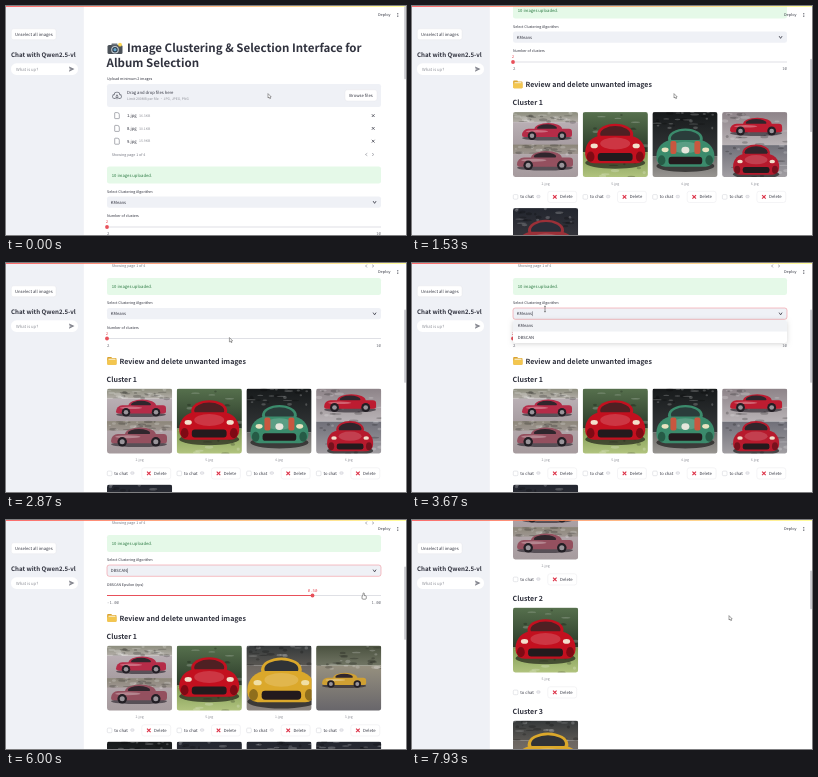
An HTML page with a canvas for the animation above (8000 ms loop, 400 by 229 pixels).

```html
<!DOCTYPE html>
<html lang="en">
<head>
<meta charset="utf-8">
<title>Image clustering</title>
<style>
html, body { margin: 0; width: 100%; height: 100%; overflow: hidden; background: #fff; }
canvas { display: block; width: 100vw; height: 100vh; }
</style>
</head>
<body>
<canvas id="stage"></canvas>
<script>
const W = 400, H = 229, LOOP = 8000;
const canvas = document.getElementById('stage');
const ctx = canvas.getContext('2d');
const SANS = '"Noto Sans CJK SC", "Noto Sans CJK JP", "Noto Sans CJK", "Open Sans", sans-serif';
const MONO = '"Noto Sans Mono", "DejaVu Sans Mono", monospace';
const INK = '#31333f', GREY = '#8f9199', RED = '#e8505a', PANEL = '#eff1f6', LINE = '#e2e3e8';
const LEFT = 101, RIGHT = 375, WIDE = RIGHT - LEFT, PHOTO = 65.2, COLUMN = 69.7;
const BODY = 4.2, LABEL = 3.62, SMALL = 3.45, HEADING = 7.05;

// Moments at which the page changes
const OPEN = 3400, PICK = 4330, REGROUP = 5270, SLIDE = 6250, SPLIT = 7000;

const ramp = (t, a, b) => Math.min(1, Math.max(0, (t - a) / (b - a)));
const ease = (t, a, b) => { const k = ramp(t, a, b); return k * k * (3 - 2 * k); };

const scrollAt = t => 165 * ramp(t, 60, 1330) - 19.5 * ramp(t, 2260, 2560) + 151 * ramp(t, 7060, 7900);

function cursorAt(t) {
  const toSelect = ease(t, 2640, 3280), toOption = ease(t, 3680, 4120);
  const toValue = ease(t, 4950, 5850), away = ease(t, 6500, 7000);
  return [
    263 - 130 * toSelect - 2 * toOption + 227 * toValue - 40 * away,
    90 - 44 * toSelect + 30 * toOption + 22 * away
  ];
}

function text(str, x, cy, size, color = INK, { bold = false, align = 'left', mono = false } = {}) {
  ctx.font = `${bold ? 700 : 400} ${size}px ${mono ? MONO : SANS}`;
  ctx.textAlign = align;
  ctx.fillStyle = color;
  ctx.fillText(str, x, cy + size * 0.36);
}

function box(x, y, w, h, r, fill, edge, lw = 0.4) {
  ctx.beginPath();
  ctx.roundRect(x, y, w, h, r);
  if (fill) { ctx.fillStyle = fill; ctx.fill(); }
  if (edge) { ctx.strokeStyle = edge; ctx.lineWidth = lw; ctx.stroke(); }
}

function rect(color, x, y, w, h) {
  ctx.fillStyle = color;
  ctx.fillRect(x, y, w, h);
}

function oval(color, x, y, rx, ry = rx, from = 0, to = 2 * Math.PI) {
  ctx.beginPath();
  ctx.ellipse(x, y, rx, ry, 0, from, to);
  ctx.fillStyle = color;
  ctx.fill();
}

function line(color, lw, ...pts) {
  ctx.beginPath();
  for (let i = 0; i < pts.length; i += 2) ctx.lineTo(pts[i], pts[i + 1]);
  ctx.strokeStyle = color;
  ctx.lineWidth = lw;
  ctx.stroke();
}

function placed(x, y, draw, k = 1) {
  ctx.save();
  ctx.translate(x, y);
  ctx.scale(k, k);
  draw();
  ctx.restore();
}

function cross(x, y, r, color, lw) {
  line(color, lw, x - r, y - r, x + r, y + r);
  line(color, lw, x + r, y - r, x - r, y + r);
}

// An open angle; dx, dy point towards its tip
function chevron(x, y, r, dx, dy, color, lw) {
  line(color, lw, x - (dx + dy) * r, y - (dx + dy) * r,
    x + dx * r / 2, y + dy * r / 2,
    x - (dx - dy) * r, y + (dx - dy) * r);
}

function seeded(seed) {
  return () => (seed = (seed * 16807) % 2147483647) / 2147483647;
}

function fade(y, h, from, to) {
  const g = ctx.createLinearGradient(0, y, 0, y + h);
  g.addColorStop(0, from);
  g.addColorStop(1, to);
  rect(g, 0, y, PHOTO, h);
}

// Soft patches of light and shade inside a band
function patches(seed, y, h, count = 30) {
  const rnd = seeded(seed * 7919);
  for (let i = 0; i < count; i++) {
    const tone = rnd() < 0.5 ? 'rgba(255,255,255,.2)' : 'rgba(0,0,0,.22)';
    oval(tone, rnd() * PHOTO, y + rnd() * h, 1 + rnd() * 4, 0.5 + rnd() * 1.2);
  }
}

// Unit cars: the body spans x from -1 to 1
function sideCar(x, y, size, color) {
  placed(x, y, () => {
    oval('rgba(20,15,25,.55)', 0, 0.24, 1, 0.1);
    oval(color, 0.05, -0.12, 0.55, 0.24);
    oval('#30262d', 0, -0.16, 0.4, 0.15);
    box(-1, -0.13, 2, 0.33, [0.3, 0.15, 0.1, 0.1], color);
    oval('rgba(255,255,255,.3)', -0.4, -0.03, 0.45, 0.05);
    for (const side of [-0.6, 0.6]) {
      oval('#221e24', side, 0.15, 0.17);
      oval('#99949a', side, 0.15, 0.09);
    }
  }, size);
}

function frontCar(x, y, size, color, glass, lamp = '#f3e0cc') {
  placed(x, y, () => {
    oval('rgba(10,10,10,.6)', 0, 0.62, 1, 0.2);
    oval(color, 0, -0.32, 0.6, 0.36);
    oval(glass, 0, -0.34, 0.5, 0.26);
    box(-1, -0.28, 2, 0.92, [0.55, 0.55, 0.3, 0.3], color);
    oval('rgba(255,255,255,.16)', 0, -0.02, 0.5, 0.2);
    box(-0.58, 0.3, 1.16, 0.26, 0.1, '#231a1d');
    for (const side of [-1, 1]) {
      oval(lamp, side * 0.7, 0.06, 0.12, 0.08);
      oval('rgba(0,0,0,.35)', side * 0.82, 0.42, 0.13, 0.17);
    }
  }, size);
}

function showCar(seed, color) {
  fade(0, 66, '#23262f', '#4b474a');
  patches(seed, 0, 20);
  frontCar(33, 32, 30, color, '#2a2d38');
}

const photos = [
  () => {
    fade(0, 10, '#8b8c7c', '#b3aea8');
    fade(10, 23, '#b9afb4', '#a79da1');
    patches(1, 0, 10);
    sideCar(34, 20, 25, '#b52c48');
    fade(32.5, 10, '#8c8679', '#9f9792');
    fade(42, 24, '#b1a6aa', '#a59a9d');
    patches(2, 33, 9);
    sideCar(32, 49, 28, '#94505f');
  },
  () => {
    fade(0, 40, '#56704d', '#2b3a29');
    fade(40, 26, '#7f9a54', '#b3c580');
    patches(3, 0, 66);
    frontCar(32.5, 32, 30, '#c3101f', '#4f2023');
  },
  () => {
    fade(0, 44, '#171a1b', '#35383a');
    fade(44, 22, '#6d6c6a', '#9a9793');
    patches(4, 0, 16);
    frontCar(33, 36, 29, '#3b8b6c', '#2a3d3b', '#e9e3c0');
    for (const side of [-1, 1]) box(33 + side * 12 - 3, 29, 6, 13, 2, '#c9573f');
    oval('#e6e6dc', 33, 38, 4, 3.4);
  },
  () => {
    fade(0, 33, '#8d8388', '#b9b3b6');
    patches(5, 0, 33);
    sideCar(34, 15, 26, '#bd1c31');
    fade(33, 33, '#6f6f78', '#a3a0a4');
    patches(6, 33, 33);
    frontCar(34, 48, 23, '#b71a2d', '#30252b');
  },
  () => showCar(7, '#9c3038'),
  () => {
    fade(0, 20, '#35393a', '#5a5753');
    fade(20, 46, '#6b6560', '#8d8681');
    patches(8, 0, 20);
    frontCar(35, 35, 34, '#dba82b', '#303236', '#f0dfa4');
  },
  () => {
    fade(0, 20, '#4a513f', '#717564');
    fade(20, 46, '#96907f', '#67656a');
    patches(9, 0, 24);
    sideCar(28, 35, 22, '#cfa033');
  },
  () => showCar(10, '#94683c'),
  () => showCar(11, '#843a3c')
];
const order = [2, 5, 4, 6, 8, 1, 3, 9, 7];

function card(id, x, y) {
  ctx.save();
  ctx.beginPath();
  ctx.roundRect(x, y, PHOTO, 64.8, 2.3);
  ctx.clip();
  ctx.translate(x, y);
  photos[id]();
  ctx.restore();
  text(order[id] + '.jpg', x + PHOTO / 2, y + 71.3, SMALL, GREY, { align: 'center' });
  const cy = y + 84.8;
  box(x + 0.3, cy - 2.3, 4.6, 4.6, 1, '#fff', '#c3c5cc');
  text('to chat', x + 7.3, cy, BODY);
  box(x + 23.7, cy - 1.6, 3.4, 2.5, 1, '#ececf0', '#adafb6', 0.3);
  box(x + 34.8, cy - 5.6, 28.9, 11.2, 2.3, '#fff', LINE);
  cross(x + 41.8, cy, 1.8, '#dc2f45', 1.1);
  text('Delete', x + 47, cy, BODY);
}

function clusters(groups, shift) {
  groups.forEach((group, n) => {
    const cy = 261.7 + n * 113;
    text('Cluster ' + (n + 1), LEFT - 0.4, cy, HEADING, INK, { bold: true });
    group.forEach((id, i) => card(id, LEFT + (i % 4) * COLUMN, cy + 9.4 + shift + Math.floor(i / 4) * 96));
  });
}

function camera() {
  box(0.5, 3, 15, 9, 1.5, '#4b5158');
  box(4.5, 1.5, 6, 2, 0.5, '#6b737b');
  ['#c3cbd2', '#273949', '#6aa4c8'].forEach((c, i) => oval(c, 8, 7.7, 3.8 - i * 1.1));
  oval('#ffd955', 13, 2.7, 1.9);
}

function cloud() {
  [['#747781', 0], [PANEL, 0.8]].forEach(([color, inset]) => {
    for (const k of [-1, 0, 1]) oval(color, k * 2.5, k ? 0.8 : -0.8, (k ? 2.4 : 3.2) - inset);
  });
  line('#747781', 0.8, 0, 3.6, 0, -0.6);
  chevron(0, -0.4, 1.2, 0, -1, '#747781', 0.8);
}

function folder() {
  box(0, 0, 4.5, 4, 0.6, '#d9a22f');
  box(0, 1, 9.2, 6.7, 0.8, '#e3ad38');
  rect('#f7f0d9', 1.2, 1.6, 7, 1.6);
  box(0, 2.6, 9.2, 5.1, 0.8, '#f3c64f');
}

function uploader() {
  placed(101, 36, camera);
  text('Image Clustering & Selection Interface for', 121, 41.6, 11.5, INK, { bold: true });
  text('Album Selection', 100.6, 57.1, 11.5, INK, { bold: true });
  text('Upload minimum 2 images', LEFT, 72.5, LABEL);
  box(LEFT, 78, WIDE, 23, 2.3, PANEL);
  placed(111, 89.7, cloud);
  text('Drag and drop files here', 121, 86.2, BODY);
  text('Limit 200MB per file • JPG, JPEG, PNG', 121, 93.2, SMALL, GREY);
  box(339, 83.8, 32, 11.2, 2.3, '#fff', LINE);
  text('Browse files', 355, 89.3, BODY, INK, { align: 'center' });
  ['1.jpg 36.3KB', '8.jpg 30.1KB', '9.jpg 15.9KB'].forEach((file, i) => {
    const y = 109.6 + i * 12.8;
    const [name, size] = file.split(' ');
    box(108.7, y - 3, 4.6, 6, [0.5, 2, 0.5, 0.5], null, '#747781', 0.6);
    text(name, 121, y, BODY);
    text(size, 133, y, SMALL, GREY);
    cross(367.2, y, 1.4, INK, 0.7);
  });
  text('Showing page 1 of 4', 105.7, 148.5, LABEL, '#777983');
  chevron(360, 148.5, 1.3, -1, 0, GREY, 0.6);
  chevron(367.3, 148.5, 1.3, 1, 0, GREY, 0.6);
  box(LEFT, 160.5, WIDE, 17, 2.3, '#e5f9e8');
  text('10 images uploaded.', 105.8, 169.4, BODY, '#28773f');
}

function slider(t, dbscan) {
  const value = t < SLIDE ? 0.5 : 0.88;
  const x = dbscan ? LEFT + WIDE * (value + 1) / 2 : LEFT;
  const [title, shown, min, max] = dbscan
    ? ['DBSCAN Epsilon (eps)', value.toFixed(2), '-1.00', '1.00']
    : ['Number of clusters', '2', '2', '10'];
  text(title, LEFT, 209.9, LABEL);
  rect('#dfe0e5', LEFT, 220.5, WIDE, 1);
  rect(RED, LEFT, 220.5, x - LEFT, 1);
  oval(RED, x, 221, 1.9);
  text(shown, x, 215.7, 4, RED, { mono: true, align: 'center' });
  text(min, LEFT, 227.7, 4, '#666872', { mono: true });
  text(max, RIGHT, 227.7, 4, '#666872', { mono: true, align: 'right' });
}

function picker(t, dbscan) {
  const focus = t >= OPEN && t < SLIDE;
  const label = dbscan ? 'DBSCAN' : 'KMeans';
  text('Select Clustering Algorithm', LEFT, 185.4, LABEL);
  box(LEFT, 190.5, WIDE, 11.3, 2.3, PANEL, focus ? '#ee7f88' : null, 0.5);
  text(label, 104.8, 196.2, BODY);
  if (focus) rect(INK, 105.2 + ctx.measureText(label).width, 193.8, 0.4, 4.8);
  chevron(368.6, 196.6, 1.5, 0, 1, INK, 0.8);
}

function menu() {
  ctx.save();
  ctx.shadowColor = 'rgba(0,0,0,.16)';
  ctx.shadowBlur = 5;
  ctx.shadowOffsetY = 1;
  box(LEFT, 202.6, WIDE, 23, 2.3, '#fff');
  ctx.restore();
  box(LEFT, 202.6, WIDE, 11.3, [2.3, 2.3, 0, 0], '#f0f2f5');
  ['KMeans', 'DBSCAN'].forEach((name, i) => text(name, 105.8, 208.3 + i * 11.4, BODY));
}

function sidebar() {
  rect(PANEL, 0, 0, 77.8, H);
  box(5.3, 22.8, 44.8, 11, 2.3, '#fff', LINE);
  text('Unselect all images', 27.8, 28.3, BODY, INK, { align: 'center' });
  text('Chat with Qwen2.5-vl', 5, 48.9, 6.14, INK, { bold: true });
  box(5, 57.3, 67, 11.6, 5.4, '#fff');
  text('What is up?', 10, 63.2, BODY, GREY);
  ctx.fillStyle = '#80828b';
  ctx.fill(new Path2D('M63 60.5 68.5 63.1 63 65.7 63.6 63.4 66 63.1 63.6 62.8Z'));
}

function cursor(t) {
  const [x, y] = cursorAt(t);
  placed(x, y, () => {
    if (t > 3200 && t < 3780) {
      line('#333', 0.5, 0, -2.7, 0, 2.7);
      for (const end of [-2.7, 2.7]) line('#333', 0.5, -1, end, 1, end);
    } else if (t >= 3780 && t < 6750) {
      box(-1, -3, 1.3, 4, 0.6, '#fff', '#333', 0.5);
      box(-2, -0.4, 4.3, 3.6, 1, '#fff', '#333', 0.5);
      rect('#fff', -0.75, -1, 0.8, 2);
    } else {
      const arrow = new Path2D('M-1-2.4V2L0 1.2 .8 2.7 1.5 2.4 .9 1 2.2.9Z');
      ctx.fillStyle = '#fff';
      ctx.fill(arrow);
      ctx.strokeStyle = '#444';
      ctx.lineWidth = 0.5;
      ctx.stroke(arrow);
    }
  });
}

function chrome(scroll, ratio) {
  const grad = ctx.createLinearGradient(0, 0, W, 0);
  grad.addColorStop(0, '#ff4b4b');
  grad.addColorStop(1, '#fffd80');
  rect(grad, 0, 0, W, 0.8);
  text('Deploy', 372, 9, 3.8);
  for (const dy of [-1.5, 0, 1.5]) oval(INK, 391.8, 9 + dy, 0.5);
  box(398.2, scroll * ratio, 1.8, H * ratio, 0.9, '#c8c9ce');
}

function render(t) {
  ctx.setTransform(canvas.width / W, 0, 0, canvas.height / H, 0, 0);
  ctx.textRendering = 'geometricPrecision';
  rect('#fff', 0, 0, W, H);
  const scroll = scrollAt(t);
  const dbscan = t >= PICK;
  const groups = t < REGROUP ? [[0, 1, 2, 3, 4]]
    : t < SPLIT ? [[0, 1, 5, 6, 2, 4, 7, 8]]
    : [[0], [1], [5], [6]];
  placed(0, -scroll, () => {
    uploader();
    picker(t, dbscan);
    slider(t, dbscan);
    placed(101.3, 239.6, folder);
    text('Review and delete unwanted images', 113.5, 243.7, HEADING, INK, { bold: true });
    clusters(groups, dbscan && t < REGROUP ? 4.5 : 0);
    if (t >= OPEN && t < PICK) menu();
  });
  sidebar();
  chrome(scroll, t < SPLIT ? 0.32 : 0.17);
  cursor(t);
}

function fit() {
  const dpr = window.devicePixelRatio || 1;
  canvas.width = Math.round(innerWidth * dpr);
  canvas.height = Math.round(innerHeight * dpr);
}

const start = performance.now();
function tick() {
  render((performance.now() - start) % LOOP);
  requestAnimationFrame(tick);
}
addEventListener('resize', fit);
fit();
tick();
</script>
</body>
</html>
```
